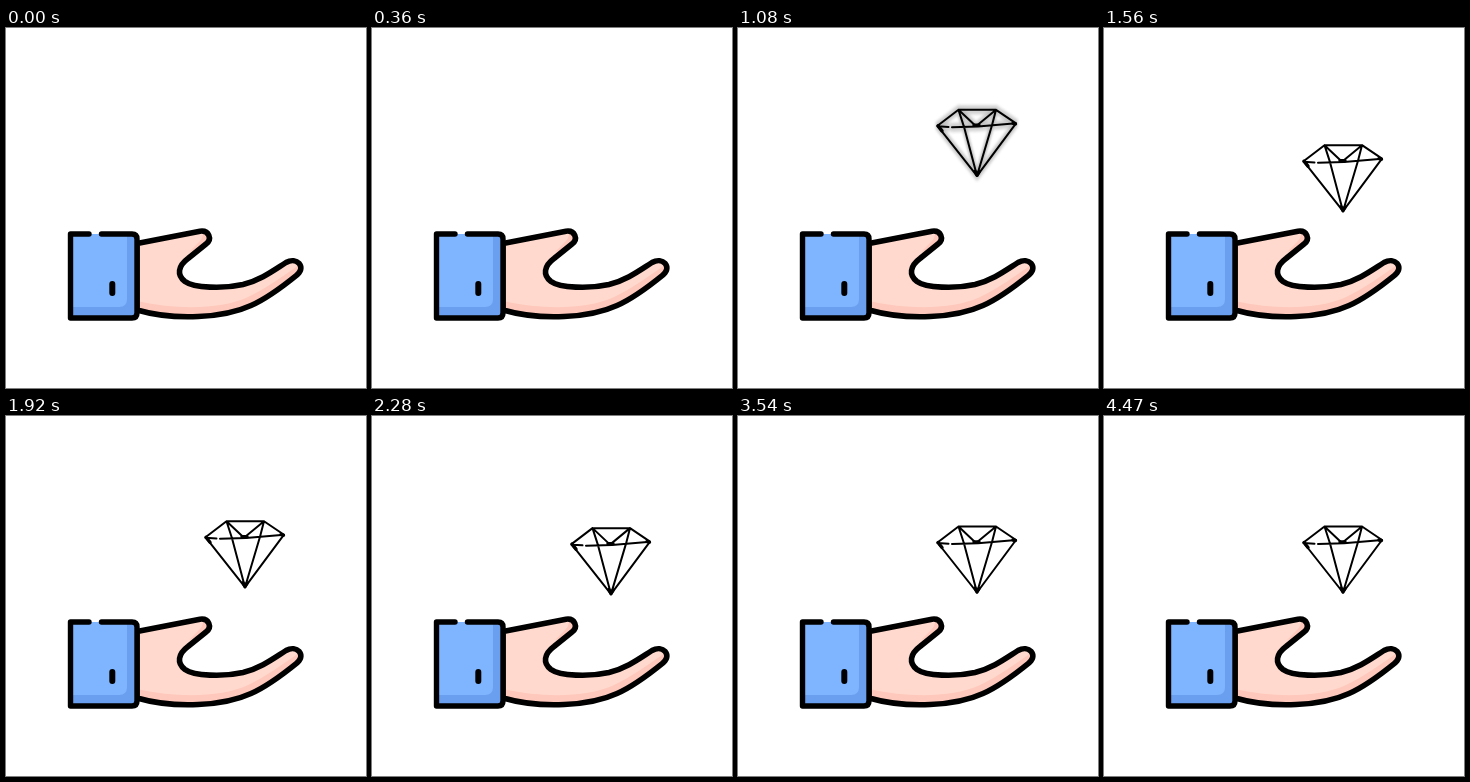
These frames come from a looping animation (360x360 px, 4500 ms). An HTML page:

```html
<!DOCTYPE html>
<html lang="en">
<head>
<meta charset="utf-8">
<title>Hand and diamond</title>
<style>
  html, body { margin: 0; width: 100%; height: 100%; overflow: hidden; background: #fff; }
  svg { display: block; width: 100%; height: 100%; }
  .line { fill: none; stroke: #000; stroke-linecap: round; stroke-linejoin: round; }
</style>
</head>
<body>
<svg viewBox="0 0 360 360">
  <defs>
    <path id="palm" d="M131 215.5 L194 203.2 C203 202 206.500 211 200 216 L182 230.500 C172 238 170.500 247 179 253.500 C188 260 217 261 237 256.500 C255 252 268 242 280 234.500 C291 228.500 300 239 291.500 246.500 C281 255 264 269 245 277.500 C218 290 169 293 131 282 Z"/>
    <clipPath id="palmClip"><use href="#palm"/></clipPath>
    <path id="gem" d="M220.500 110.500 H258 L278 124 L239 176.500 L199.500 126.500 Z M220.500 110.500 L238 127 L258 110.500 M220.500 110.500 L226 127.500 L239 176.500 L254 126 L258 110.500 M199.500 127 L210.500 127.700 M214 128 L240 127.300 L278 124"/>
    <filter id="soft" x="-20%" y="-20%" width="140%" height="140%"><feGaussianBlur stdDeviation="0.8"/></filter>
  </defs>

  <use href="#palm" fill="#ffd9cd"/>
  <g clip-path="url(#palmClip)">
    <path fill="#ffc8bc" d="M131 273 C175 283 217 280 240 270 C263 259 280 246 300 232 V300 H131 Z"/>
    <path fill="#ffc8bc" d="M196 202 Q199 209 192 215 L183 224 L202 218 L208 202 Z"/>
  </g>
  <use href="#palm" class="line" stroke-width="5.6"/>

  <path fill="#7fb4ff" d="M64 206 H126 Q131 206 131 211 V285 Q131 290 126 290 H64 Z"/>
  <path fill="#699fee" d="M121 206 H126 Q131 206 131 211 V285 Q131 290 126 290 H64 V279 H113 Q121 279 121 271 Z"/>
  <path class="line" stroke-width="5.4" d="M83 206 H64.500 V290 H126 Q131 290 131 285 V211 Q131 206 126 206 H95.500"/>
  <path class="line" stroke-width="6" d="M106.300 256 V265"/>

  <g id="drop">
    <g id="haze" class="line" style="stroke:#777" stroke-width="4" filter="url(#soft)"></g>
    <use href="#gem" class="line" stroke-width="2"/>
    <path class="line" stroke-width="3.400" d="M200 126.500 L204 131.500 M237 172 L239 176 L241 172.500 M275 124 L277.500 124.500 M236 126 H241"/>
  </g>
</svg>
<script>
const LOOP = 4500, START = 500;

// time, vertical offset from rest
const steps = [
  [500, -57], [720, 8], [825, 22], [1110, -30], [1470, 9],
  [1830, -6.5], [2200, 2], [2540, -0.7], [2700, 0], [LOOP, 0]
];
const drop = document.getElementById('drop');
const haze = document.getElementById('haze');

const ghosts = [-1, -0.5, 0, 0.5, 1].map(shift => {
  const el = document.createElementNS('http://www.w3.org/2000/svg', 'use');
  el.setAttribute('href', '#gem');
  el.setAttribute('opacity', 0.3);
  haze.append(el);
  return { el, shift };
});

const clamp = v => Math.min(1, Math.max(0, v));

function offset(t) {
  if (t <= START) return steps[0][1];
  const i = Math.max(1, steps.findIndex(s => t <= s[0]));
  const [t0, y0] = steps[i - 1], [t1, y1] = steps[i];
  const p = (t - t0) / (t1 - t0);
  const eased = i === 1 ? p
    : i === 2 ? Math.sin(p * Math.PI / 2)
    : (1 - Math.cos(p * Math.PI)) / 2;
  return y0 + (y1 - y0) * eased;
}

function draw(t) {
  const visible = t >= START;
  drop.style.display = visible ? '' : 'none';
  if (!visible) return;
  const y = offset(t);
  const speed = Math.abs(y - offset(t - 30));
  const fade = clamp((1350 - t) / 450);
  drop.setAttribute('transform', `translate(0 ${y})`);
  drop.setAttribute('opacity', clamp(0.4 + (t - START) / 250));
  haze.style.display = fade > 0 ? '' : 'none';
  haze.setAttribute('opacity', fade);
  for (const { el, shift } of ghosts) {
    el.setAttribute('transform', `translate(0 ${shift * Math.min(8, speed * 0.85)})`);
  }
}

const begin = performance.now();
function tick(now) {
  draw(Math.max(0, now - begin) % LOOP);
  requestAnimationFrame(tick);
}
draw(0);
requestAnimationFrame(tick);
</script>
</body>
</html>
```
